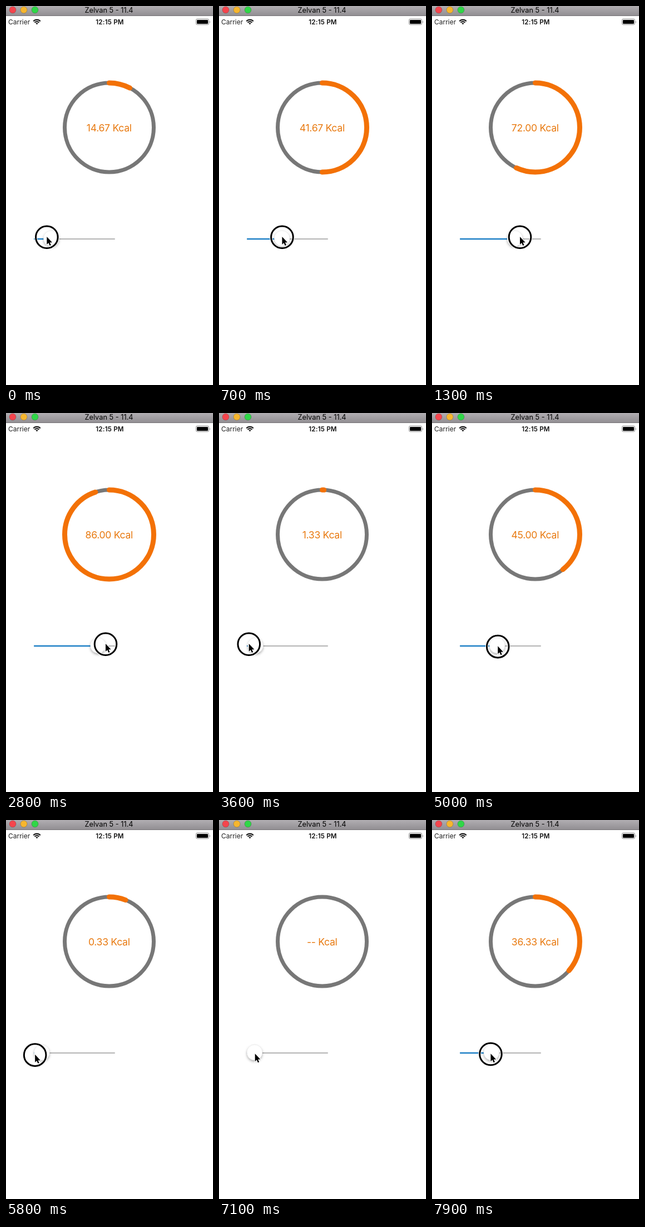
These frames come from a looping animation (372x680 px, 8000 ms). An HTML page:

```html
<!DOCTYPE html>
<html lang="en">
<head>
<meta charset="utf-8">
<title>Calorie dial</title>
<style>
  html, body { margin: 0; width: 100%; height: 100%; overflow: hidden; background: #fff; }
  svg { display: block; width: 372px; height: 680px; font-family: Inter, "Open Sans", sans-serif; }
  #label { font-size: 17.6px; fill: #e8790f; letter-spacing: -.3px; }
</style>
</head>
<body>
<svg viewBox="0 0 372 680">
  <defs>
    <linearGradient id="bar" x2="0" y2="1">
      <stop stop-color="#b1aeb2"/><stop offset="1" stop-color="#918e92"/>
    </linearGradient>
    <filter id="shadow" x="-50%" y="-50%" width="200%" height="200%">
      <feDropShadow dx="0" dy="2.5" stdDeviation="2.2" flood-opacity=".3"/>
    </filter>
  </defs>

  <rect width="372" height="17.5" fill="url(#bar)"/>
  <rect y="17" width="372" height="1" fill="#777478"/>
  <g stroke-opacity=".25" stroke="#000" stroke-width=".8">
    <circle cx="12" cy="7" r="6" fill="#f5454d"/>
    <circle cx="32" cy="7" r="6" fill="#f6b62e"/>
    <circle cx="52" cy="7" r="6" fill="#2fd747"/>
  </g>
  <text x="185" y="12" font-size="12.8" text-anchor="middle">Zelvan 5 - 11.4</text>

  <text x="4" y="32.5" font-size="12" fill="#222">Carrier</text>
  <g fill="none" stroke="#111" stroke-width="2.1">
    <path d="M49.2 27.2a9 9 0 0 1 12.6 0M51.5 29.7a5.7 5.7 0 0 1 8 0"/>
    <path d="M53.4 31.2a3 3 0 0 1 4.2 0L55.5 33.3Z" fill="#111" stroke="none"/>
  </g>
  <text x="186.5" y="32.5" font-size="11.6" font-weight="600" letter-spacing=".2" text-anchor="middle" fill="#111">12:15 PM</text>
  <rect x="341.5" y="23.2" width="23" height="10.3" rx="2.2" fill="none" stroke="#888"/>
  <rect x="343" y="25" width="20" height="7" rx="1" fill="#000"/>
  <path d="M366 26.5q1.8 2 0 4Z" fill="#888"/>

  <g fill="none" transform="rotate(-90 185.5 218)">
    <circle cx="185.5" cy="218" r="80" stroke="#777" stroke-width="7"/>
    <circle id="arc" cx="185.5" cy="218" r="80" pathLength="100" stroke="#f37106" stroke-width="9" stroke-linecap="round"/>
  </g>
  <text id="label" x="185.3" y="224.5" text-anchor="middle"></text>

  <rect x="50" y="417" width="146" height="2" rx="1" fill="#b4b4b4"/>
  <rect id="fill" x="50" y="416.7" height="2.5" rx="1" fill="#1f80c6"/>
  <circle id="thumb" cy="417" r="14" fill="#fff" stroke="#000" stroke-opacity=".12" stroke-width=".6" filter="url(#shadow)"/>

  <g id="pointer">
    <g id="ring" fill="none">
      <circle r="19.8" stroke="#fff" stroke-width="5"/>
      <circle r="19.8" stroke="#000" stroke-width="3"/>
    </g>
    <path d="M0-.8V13.2L3.1 10.3 5.2 15.2 7.5 14.2 5.4 9.5H9.7Z" stroke="#fff" stroke-width="2.2" paint-order="stroke"/>
  </g>
</svg>

<script>
const LOOP = 8, STEP = 0.1;

// Turning points of the hand: seconds, percent (below 0 is past the track's end)
const turns = [
  [-.343, 0], [.6, 50], [.85, 26], [1.63, 100], [2.1, 45], [2.556, 100],
  [3.556, 0], [3.945, 44], [4.655, 16], [5, 45], [5.38, 18], [6.04, -7],
  [6.8, -7], [7.1, 0], [7.2, 0], [7.7, 36.33]
];

const $ = id => document.getElementById(id);
const [arc, label, fill, thumb, pointer, ring] =
  ["arc", "label", "fill", "thumb", "pointer", "ring"].map($);

const clamp = (n, lo, hi) => Math.min(hi, Math.max(lo, n));
const ease = (t, from, to) => (1 - Math.cos(Math.PI * clamp((t - from) / (to - from), 0, 1))) / 2;

// Each stroke adds its eased share.
const hand = t => turns.reduce((sum, [end, v], i) => {
  if (!i) return v;
  const [begin, last] = turns[i - 1];
  return sum + (v - last) * ease(t, begin, end);
}, 0);

const slider = t => Math.round(clamp(hand(t), 0, 100) * 3) / 3;

function draw(t) {
  const value = slider(t);
  const part = slider(t - STEP); // the dial trails by one update
  const x = 64 + 1.18 * value;
  arc.setAttribute("stroke-dasharray", `${part} 200`);
  arc.style.opacity = part > 0 ? 1 : 0;
  label.textContent = (value > 0 ? value.toFixed(2) : "--") + " Kcal";
  fill.setAttribute("width", x - 50);
  thumb.setAttribute("cx", x);

  // The pointer swings wider than the thumb and comes back to it between drags.
  const rest = ease(t, 6.8, 7.1);
  const px = 51.7 + 1.48 * hand(t) + 13 * (rest - ease(t, 7.2, 7.7));
  const py = 414.7 + 7.3 * ease(t, 3.4, 6.2) - 2 * rest;
  pointer.setAttribute("transform", `translate(${px} ${py})`);
  ring.style.opacity = 1 - ease(t, 6.3, 6.7) + ease(t, 7.1, 7.3);
}

const start = performance.now();
function tick() {
  const t = (performance.now() - start) / 1000 % LOOP;
  draw(Math.floor(t / STEP + 1e-6) * STEP);
  requestAnimationFrame(tick);
}
tick();
</script>
</body>
</html>
```
